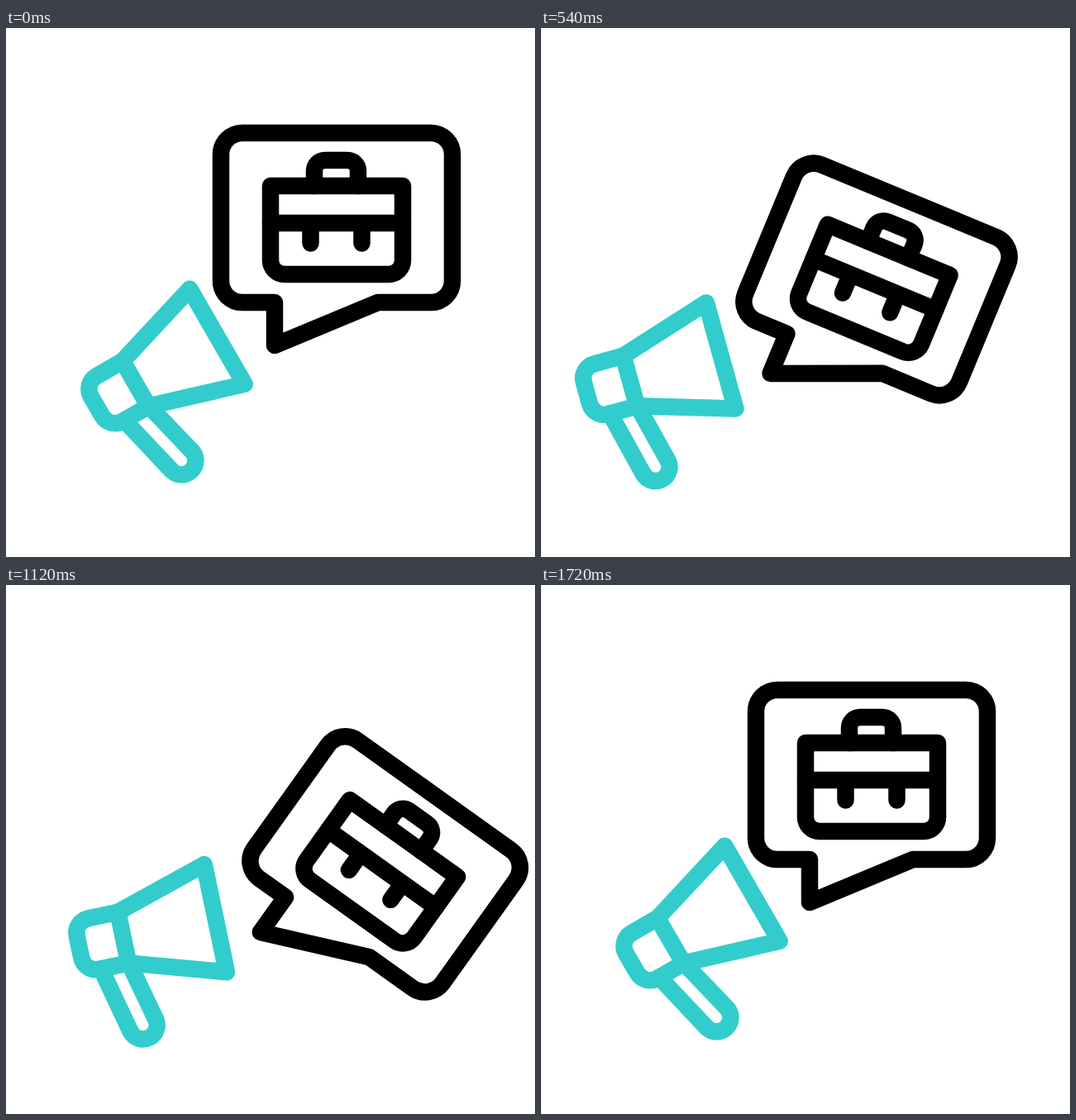
Write an HTML page that moves like this. It is 640 by 640 pixels and loops after 2.4 s.

```html
<!DOCTYPE html>
<html lang="en">
<head>
<meta charset="utf-8">
<title>Job announcement</title>
<style>
  html, body { margin: 0; width: 100%; height: 100%; overflow: hidden; background: #fff; }
  svg { display: block; width: 100vw; height: 100vh; }
  path { fill: none; stroke-width: 20.5; stroke-linecap: round; stroke-linejoin: round; }
  #horn { stroke: #33cccc; }
  #bubble { stroke: #000; }
</style>
</head>
<body>
<svg viewBox="0 0 640 640">
  <g id="scene">
    <g id="horn">
      <path d="M143 474.5 L200.6 535.6 A17 17 0 0 0 225.4 512.4 L173 457.5"/>
      <g transform="translate(141 403) rotate(-30)">
        <path d="M0 0 H-36.5 a18 18 0 0 0 -18 18 V45 a18 18 0 0 0 18 18 H0"/>
        <path d="M0 0 V63 L114 98 V-35 Z"/>
      </g>
    </g>
    <g id="bubble">
      <path d="M286 127 H514 a26 26 0 0 1 26 26 V306 a26 26 0 0 1 -26 26 H450 L325 384 V332 H286 a26 26 0 0 1 -26 -26 V153 a26 26 0 0 1 26 -26 Z"/>
      <path d="M320 191 H480 V281 a17 17 0 0 1 -17 17 H337 a17 17 0 0 1 -17 -17 Z"/>
      <path d="M373 191 V173 a13 13 0 0 1 13 -13 H413 a13 13 0 0 1 13 13 V191"/>
      <path d="M320 236 H480 M368.5 236 V260.5 M430.5 236 V260.5"/>
    </g>
  </g>
</svg>
<script>
  const LOOP = 2400, STEP = 20, END = 1720, BEAT = 445;

  // The bubble swings a little behind the tilt of the whole scene
  const tilt = { start: 0, peak: 188, high: 20.4, low: 4.6, dip: -3.5 };
  const swing = { start: 30, peak: 273, high: 18.4, low: 6.9, dip: -2.7 };

  function ease(p) {
    p = Math.min(1, Math.max(0, p));
    return p * p * (3 - 2 * p);
  }

  const blend = (a, b, t, from, to) => a + (b - a) * ease((t - from) / (to - from));

  // Rise to the first peak, rock for two beats, overshoot, then settle
  function rock(t, { start, peak, high, low, dip }) {
    const last = peak + 2 * BEAT, turn = last + BEAT / 2;
    if (t < peak) return blend(0, high, t, start, peak);
    if (t < last) {
      const wave = Math.cos(2 * Math.PI * (t - peak) / BEAT);
      return (high + low) / 2 + (high - low) / 2 * wave;
    }
    if (t < turn) return blend(high, dip, t, last, turn);
    return blend(dip, 0, t, turn, END);
  }

  const recoil = t => -60 * (ease(t / 440) - ease((t - 470) / (END - 470)));

  const scene = document.getElementById('scene');
  const bubble = document.getElementById('bubble');
  const start = performance.now();

  function draw() {
    const elapsed = (performance.now() - start) % LOOP;
    const t = Math.floor(elapsed / STEP) * STEP;
    scene.setAttribute('transform', `translate(${recoil(t)} 0) rotate(${rock(t, tilt)} 175 470)`);
    bubble.setAttribute('transform', `rotate(${rock(t, swing)} 357 337)`);
    requestAnimationFrame(draw);
  }
  draw();
</script>
</body>
</html>
```
